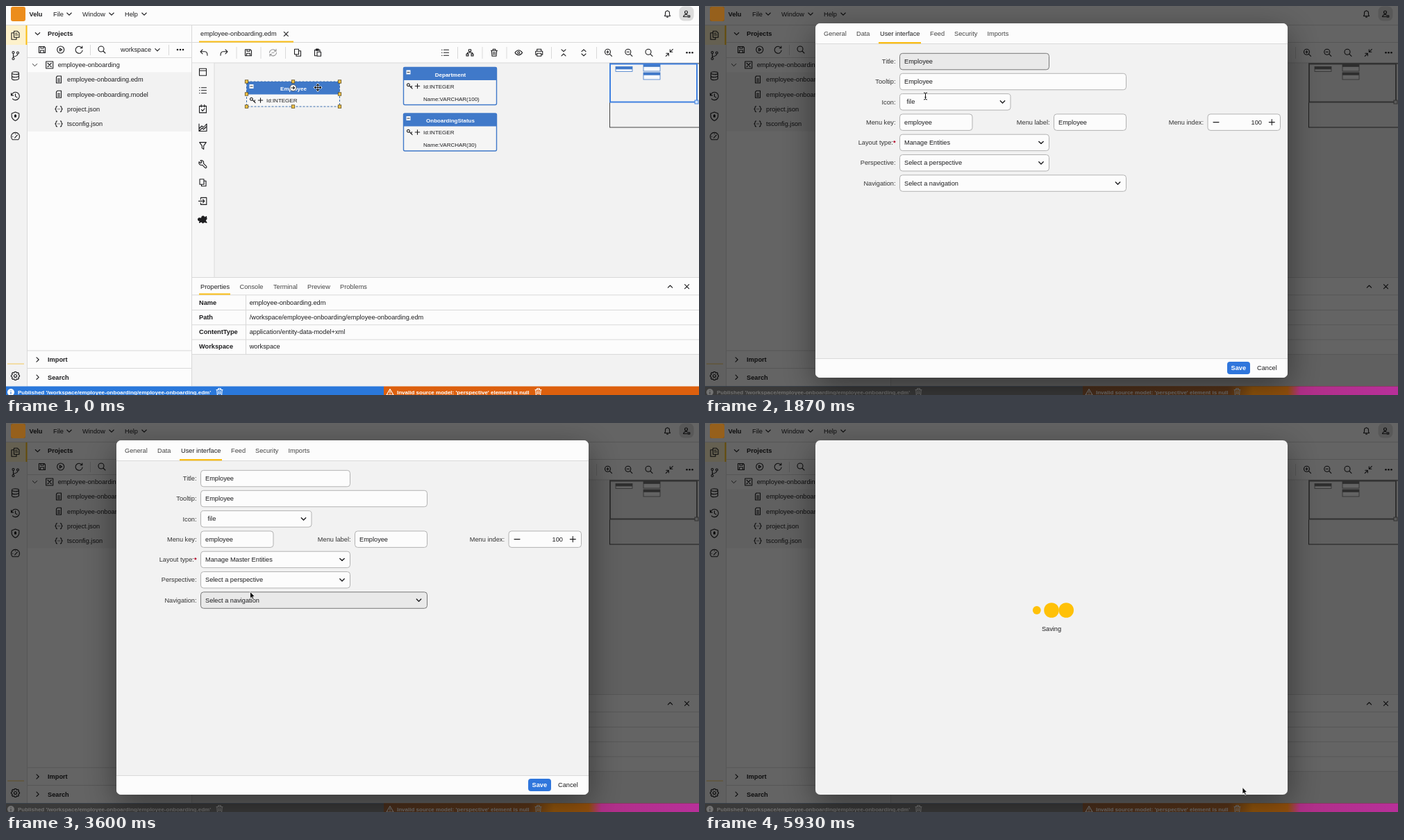
Animation, 998 px wide and 561 px high, one loop 6 s. Source, as an HTML page:

```html
<!DOCTYPE html>
<html lang="en">
<head>
<meta charset="utf-8">
<title>Entity editor</title>
<style>
  html, body { margin: 0; width: 100%; height: 100%; overflow: hidden; background: #f2f2f2; }
  svg { display: block; width: 998px; height: 561px; font: 9.23px "Liberation Sans", Arial, sans-serif; }
  text { fill: #1d1d1f; white-space: pre; }
  .b { font-weight: bold; }
  .icon { fill: none; stroke: #1d1d1f; stroke-width: 1.1; stroke-linejoin: round; stroke-linecap: round; }
  .dimmed #minimap { filter: grayscale(1); }
</style>
</head>
<body>
<svg id="stage" viewBox="0 0 998 561">
  <defs>
    <linearGradient id="dimBar" gradientUnits="userSpaceOnUse" x1="544" x2="998" y1="0" y2="0">
      <stop offset="0" stop-color="#4a2f1c"/>
      <stop offset=".46" stop-color="#583418"/>
      <stop offset=".54" stop-color="#93560c"/>
      <stop offset=".65" stop-color="#93500c"/>
      <stop offset=".69" stop-color="#b02f88"/>
      <stop offset="1" stop-color="#b8309a"/>
    </linearGradient>
    <filter id="shadow" x="-20%" y="-20%" width="140%" height="150%">
      <feDropShadow dx="0" dy="2" stdDeviation="3" flood-opacity=".28"/>
    </filter>
    <filter id="dialogShadow" x="-20%" y="-20%" width="140%" height="140%">
      <feDropShadow dx="0" dy="13" stdDeviation="24" flood-opacity=".45"/>
    </filter>
    <clipPath id="menuClip"><rect x="280" y="209" width="164" height="316" rx="4"/></clipPath>
  </defs>
  <g id="workbench"></g>
  <g id="modal"></g>
  <g id="cursor"></g>
</svg>
<script>
const LOOP = 6000;
const YELLOW = '#fabd14', BLUE = '#4079c9', LINE = '#d9d9d9', PAPER = '#fcfcfc', GREY = '#f2f2f2';
const $ = id => document.getElementById(id);

const SEARCH = 'M3-1A4 4 0 1 1-5-1A4 4 0 1 1 3-1M2 2L5 5';
const ICONS = {
  down: 'M-3.2-1.5L0 1.7L3.2-1.5', right: 'M-1.5-3.2L1.7 0L-1.5 3.2', up: 'M-3.2 1.5L0-1.7L3.2 1.5',
  close: 'M-3-3L3 3M3-3L-3 3', plus: 'M-4 0H4M0-4V4', minus: 'M-4 0H4', smallPlus: 'M-3.2 0H3.2M0-3.2V3.2',
  save: 'M-4.5-4.5H3L4.5-3V4.5H-4.5ZM-2-4.5V-2H2V-4.5M-2.5 4.5V1H2.5V4.5',
  play: 'M5 0A5 5 0 1 1-5 0A5 5 0 1 1 5 0M-1.3-2L2 0L-1.3 2Z',
  refresh: 'M4-2.5A5 5 0 1 0 4.8 1M4.5-5V-2.2H1.8',
  sync: 'M4-2.5A5 5 0 0 0-5 0M-4 2.5A5 5 0 0 0 5 0M4.5-5V-2.2H1.8M-4.5 5V2.2H-1.8M-1.5 0H1.5',
  search: SEARCH, zoomIn: SEARCH + 'M-2.7-1H.7M-1-2.7V.7', zoomOut: SEARCH + 'M-2.7-1H.7',
  undo: 'M-2-4.5L-5-1.5L-2 1.5M-5-1.5H1.5Q5-1.5 5 4', redo: 'M2-4.5L5-1.5L2 1.5M5-1.5H-1.5Q-5-1.5-5 4',
  copy: 'M-4.5-5H1.5V2.5H-4.5ZM1.5-2.5H4.5V5H-2V2.5', paste: 'M-2 4.5H-4.5V-4H3V-2M-2.5-5.2H1V-3H-2.5ZM-1-1H4.5V5H-1Z',
  list: 'M-5-4h.6M-2-4H5M-5 0h.6M-2 0H5M-5 4h.6M-2 4H5',
  tree: 'M-1.6-4.6H1.6V-1.8H-1.6ZM-5 1.8H-2V4.6H-5ZM2 1.8H5V4.6H2ZM0-1.8V0M-3.5 1.8V0H3.5V1.8',
  trash: 'M-4.5-3H4.5M-1.8-3V-5H1.8V-3M-3.7-3L-3 5H3L3.7-3M-1.1-1V3M1.1-1V3',
  eye: 'M-5.3 0Q0-7 5.3 0Q0 7-5.3 0ZM1.5 0A1.5 1.5 0 1 1-1.5 0A1.5 1.5 0 1 1 1.5 0',
  print: 'M-3-2V-5H3V-2M-3 3H-5V-2H5V3H3M-3 1H3V5H-3Z',
  collapse: 'M-3-4.5L0-1.7L3-4.5M-3 4.5L0 1.7L3 4.5', expand: 'M-3-1.7L0-4.5L3-1.7M-3 1.7L0 4.5L3 1.7',
  fit: 'M1-4.5V-1H4.5M5-5L1-1M-1 4.5V1H-4.5M-5 5L-1 1',
  window: 'M-5-5H5V5H-5ZM-5-2H5', calendar: 'M-5-4H5V5.5H-5ZM-2.3-6V-2.7M2.3-6V-2.7M-2 1L-.4 3L2.6-.5',
  chart: 'M-5.5-5V5.5H5.5V-5L1 0L-1.5-2L-5.5 2M-5 5L-1 1L1 3L5-1',
  filter: 'M-4.8-5H4.8L1.2 0V5L-1.2 3.3V0Z',
  wrench: 'M-5.5-3.5L-3-1.5L-1.5-3L-3.5-5.5A3.5 3.5 0 0 1 1-1L5 3A1.4 1.4 0 0 1 3 5L-1 1A3.5 3.5 0 0 1-5.5-3.5Z',
  enter: 'M-3-2.5V-5H5.3V5H-3V2.5M-6 0H2M0-2.5L2.3 0L0 2.5',
  puzzle: 'M-4-2H-1.5A2 2 0 1 1 2-2L5-4.5L5.5-1L3.5 1L5.5 4.5L2 3.5L0 5L-2 3L-5 4.5L-4 1.5A2 2 0 1 1-4-2Z',
  files: 'M-2-6H3L5.5-3.5V3H-2ZM-2-3.5H-5.5V6H1.5V3M0-3H2.5M0-.5H3.5',
  branch: 'M-3-3V3M3.5-2.5Q3 1-3 1.5M-1.5-4.5A1.5 1.5 0 1 1-4.5-4.5A1.5 1.5 0 1 1-1.5-4.5M-1.5 4.5A1.5 1.5 0 1 1-4.5 4.5A1.5 1.5 0 1 1-1.5 4.5M5-4A1.5 1.5 0 1 1 2-4A1.5 1.5 0 1 1 5-4',
  database: 'M-5-4A5 2 0 1 1 5-4A5 2 0 1 1-5-4V4A5 2 0 0 0 5 4V-4M-5 0A5 2 0 0 0 5 0',
  history: 'M-5.5-1A5.7 5.7 0 1 1-4 4M-6-4V-1H-3M0-3V.5L2.5 2', shield: 'M0-6L5.3-4.2V0Q5 4 0 6.3Q-5 4-5.3 0V-4.2ZM0-2.5V1M-1-1.5H1V.8H-1Z',
  gauge: 'M-4 4.5A6 6 0 1 1 4 4.5ZM-.8 1.8L2.8-2.2M-4 0h.3M0-4v.2',
  gear: 'M-1.2-6H1.2L1.7-4.2L3.6-5L5-3.5L4.2-1.7L6-1.1V1.1L4.2 1.7L5 3.5L3.6 5L1.7 4.2L1.2 6H-1.2L-1.7 4.2L-3.6 5L-5 3.5L-4.2 1.7L-6 1.1V-1.1L-4.2-1.7L-5-3.5L-3.6-5L-1.7-4.2ZM2 0A2 2 0 1 1-2 0A2 2 0 1 1 2 0',
  bell: 'M-4 3H4L3 1V-1.5A3 3 0 0 0-3-1.5V1ZM-1 4.6H1M0-4.5V-5',
  user: 'M1.5-2.5A2 2 0 1 1-2.5-2.5A2 2 0 1 1 1.5-2.5M-4.5 4A4 4 0 0 1 1 1.2M-4.5 4H.5M2 2.2H4.8V4.4H2Z',
  doc: 'M-2-5H3.5V5H-3.5V-3.4ZM-1.5-1H1.5M-1.5 1H1.5M-1.5 3H1.5',
  braces: 'M-2.5-4Q-4-4-4-2T-5.2 0Q-4 0-4 2T-2.5 4M2.5-4Q4-4 4-2T5.2 0Q4 0 4 2T2.5 4M-1 0h.1M1 0h.1',
  project: 'M-5-5H5V5H-5ZM-2.5-2.5L2.5 2.5M2.5-2.5L-2.5 2.5M-2.7-2.7h.2M2.5-2.7h.2M-2.7 2.7h.2M2.5 2.7h.2',
  key: 'M0 0L3.6 3.6M-.2-1.8A1.9 1.9 0 1 1-4-1.8A1.9 1.9 0 1 1-.2-1.8M2 2L3-.2',
  info: 'M0-.5V2.5M0-2.6V-2.5', warn: 'M0-4.5L5 4H-5ZM0-1.5V1M0 2.5V2.6', square: 'M-3.2-2.8H3.2V2.8H-3.2Z'
};

const rect = (x, y, w, h, fill, more = '') => `<rect x="${x}" y="${y}" width="${w}" height="${h}" fill="${fill}" ${more}/>`;
const text = (x, y, s, more = '') => `<text x="${x}" y="${y}" ${more}>${s}</text>`;
const bold = (x, y, s, more = '') => text(x, y, s, 'class="b" ' + more);
const icon = (name, x, y, more = '') => `<path class="icon" d="${ICONS[name]}" transform="translate(${x} ${y})" ${more}/>`;
const dots = (x, y) => [-4, 0, 4].map(d => `<circle cx="${x + d}" cy="${y}" r="1.3" fill="#1d1d1f"/>`).join('');
const hLine = (x, y, w, color = LINE) => rect(x, y, w, 1, color);
const vLine = (x, y, h, color = LINE) => rect(x, y, 1, h, color);
const iconRow = (y, items) => items.map(([name, x]) => icon(name, x, y)).join('');
const SMALL = 'font-size="8"', WHITE_SMALL = 'style="fill:#fff" font-size="8"';

function entity(x, y, title, columns, selected) {
  const w = 134, h = 18 + columns.length * 18, mid = x + w / 2;
  let s = rect(x, y, w, h, selected ? '#f7f7f7' : '#f5f5f5', `rx="${selected ? 0 : 2}"`) +
    rect(x, y, w, 18.5, BLUE) +
    rect(x, y, w, h, 'none', selected ? 'stroke="#3d6fae" stroke-dasharray="3 2"' : `stroke="${BLUE}" stroke-width="1.4" rx="2"`) +
    rect(x + 4, y + 4, 6, 6, '#fff') + hLine(x + 5, y + 6.5, 4, '#333') +
    bold(mid + .5, y + 13, title, 'text-anchor="middle" ' + WHITE_SMALL);
  columns.forEach((c, i) => s += text(x + 28.5, y + 30.3 + i * 18, c, SMALL));
  s += icon('key', x + 9, y + 27) + icon('smallPlus', x + 20, y + 27);
  if (selected) {
    for (const hx of [x, mid, x + w]) for (const hy of [y, y + h / 2, y + h])
      if (hx !== mid || hy !== y + h / 2) s += rect(hx - 2.2, hy - 2.2, 4.4, 4.4, '#f6c445', 'stroke="#5b4a1c" stroke-width=".8"');
    s += `<circle cx="${mid}" cy="${y + 9}" r="4.6" fill="#fff" stroke="#444" stroke-width=".8"/>` +
      `<path d="M${mid - 3} ${y + 9}h5m-2-2l2 2l-2 2" fill="none" stroke="#222" stroke-width="1.2"/>`;
  }
  return s;
}

function statusBar(fillLeft, fillRight, ink) {
  const st = `style="stroke:${ink}"`;
  return rect(0, 548.5, 544, 13, fillLeft) + rect(544, 548.5, 454, 13, fillRight) +
    `<circle cx="7" cy="557" r="5" fill="${ink}"/>` + icon('info', 7, 557, `style="stroke:${fillLeft}"`) +
    bold(17, 559.8, "Published '/workspace/employee-onboarding/employee-onboarding.edm'", `style="fill:${ink}" font-size="8"`) +
    icon('trash', 307.5, 556.5, st) + icon('warn', 553, 557, st) +
    bold(563, 559.8, "Invalid source model: 'perspective' element is null", `style="fill:${ink}" font-size="8"`) +
    icon('trash', 766.5, 556.5, st);
}

function workbench() {
  let s = rect(0, 0, 998, 561, GREY) + rect(0, 0, 998, 27, PAPER) + hLine(0, 27, 998) +
    rect(7, 1, 21, 21, '#ec8d1c', 'rx="3"') + bold(33.5, 14.5, 'Velu');
  [['File', 68, 91], ['Window', 110, 152], ['Help', 171, 199]].forEach(([n, x, c]) => s += text(x, 14.5, n) + icon('down', c, 11.5));
  s += icon('bell', 952.5, 11.5) + rect(969.5, .5, 21, 21, '#dcdcdc', 'rx="7"') + icon('user', 980, 11.5);

  s += rect(0, 28, 30, 28, '#fdf1cb') + rect(28.5, 28, 2, 28, YELLOW) + vLine(30, 56, 493);
  ['files', 'branch', 'database', 'history', 'shield', 'gauge'].forEach((n, i) => s += icon(n, 13.5, 42.3 + i * 29.2));
  s += rect(2, 515.5, 24, 1.2, '#f3cf73') + icon('gear', 13.5, 533.5);

  s += rect(31, 28, 236, 520, PAPER) + icon('down', 45.5, 40) + bold(60, 43.2, 'Projects') + hLine(31, 52, 236) +
    iconRow(63, [['save', 52], ['play', 78.7], ['refresh', 105.3], ['search', 138]]) +
    vLine(121, 56, 15) + vLine(234, 56, 15) + text(165, 66.2, 'workspace') + icon('down', 218, 63.2) + dots(251, 63) +
    hLine(31, 74, 236) + icon('down', 41.5, 85, 'style="stroke-width:.9"') + icon('project', 62.7, 85) + text(74.7, 88, 'employee-onboarding') +
    rect(31, 95.5, 236, 85.3, GREY);
  ['employee-onboarding.edm', 'employee-onboarding.model', 'project.json', 'tsconfig.json'].forEach((n, i) => {
    const y = 106 + i * 21.3;
    s += icon(i < 2 ? 'doc' : 'braces', 76, y) + text(88, y + 3.2, n);
  });
  s += hLine(31, 496.5, 236) + hLine(31, 522, 236) + vLine(267, 28, 520);
  [['Import', 510], ['Search', 535.3]].forEach(([n, y]) => s += icon('right', 45.5, y) + bold(60, y + 3.2, n));

  s += rect(268, 28, 730, 54, PAPER) + text(280, 43.3, 'employee-onboarding.edm') + icon('close', 403.3, 40.3) +
    hLine(268, 52, 730) + rect(278, 50.5, 136, 2, YELLOW) + hLine(268, 81.5, 730) +
    iconRow(67.3, [['undo', 285], ['redo', 314], ['save', 349], ['copy', 420], ['paste', 449], ['list', 632.5], ['tree', 668],
      ['trash', 703], ['eye', 738.3], ['print', 767.7], ['collapse', 803], ['expand', 832], ['zoomIn', 867.5],
      ['zoomOut', 896.8], ['search', 926], ['fit', 955.3]]) +
    icon('sync', 384.5, 67.3, 'opacity=".45"') + dots(984.5, 67.3);
  [331.5, 366.5, 402, 650, 685.5, 720.5, 785, 850].forEach(x => s += vLine(x, 59, 17));

  s += rect(268, 82.5, 32, 309, '#f7f7f7') + vLine(299.5, 82, 309);
  ['window', 'list', 'calendar', 'chart', 'filter', 'wrench', 'copy', 'enter', 'puzzle']
    .forEach((n, i) => s += icon(n, 283.5, 95.2 + i * 26.6, n === 'puzzle' ? 'style="fill:#1d1d1f"' : ''));

  s += entity(346.5, 109, 'Employee', ['Id:INTEGER'], true) +
    entity(572.5, 88.5, 'Department', ['Id:INTEGER', 'Name:VARCHAR(100)']) +
    entity(572.5, 155, 'OnboardingStatus', ['Id:INTEGER', 'Name:VARCHAR(30)']);

  s += '<g id="minimap">' + rect(869.5, 83, 135, 92, GREY, 'stroke="#444"');
  [[878, 87.5, 7], [918, 84, 10], [918, 96, 10]].forEach(([x, y, h]) =>
    s += rect(x, y, 24, h, '#f7f9fc', `stroke="${BLUE}" stroke-width=".8"`) + rect(x, y, 24, 3.8, BLUE));
  s += rect(870, 83.5, 125, 55, 'none', 'stroke="#3f80e0" stroke-width="2"') +
    rect(992, 136, 5, 5, '#d5e6fb', 'stroke="#3f80e0"') + '</g>';

  s += rect(268, 391, 730, 111, PAPER) + hLine(268, 391, 730);
  [['Properties', 280], ['Console', 336.5], ['Terminal', 385], ['Preview', 434], ['Problems', 481]]
    .forEach(([n, x], i) => s += text(x, 407.5, n, i ? 'style="fill:#444"' : ''));
  s += icon('up', 956.5, 404.7) + icon('close', 980.5, 404.7) + hLine(268, 416.3, 730) + rect(278, 414.5, 45, 2, YELLOW);
  [['Name', 'employee-onboarding.edm'], ['Path', '/workspace/employee-onboarding/employee-onboarding.edm'],
    ['ContentType', 'application/entity-data-model+xml'], ['Workspace', 'workspace']].forEach(([k, v], i) => {
    const y = 430.5 + i * 21.3;
    s += bold(278, y, k) + text(350.7, y, v) + hLine(268, y + 7.5, 730);
  });
  return s + vLine(345, 417, 85) + statusBar('#2a78db', '#dd600e', '#fff');
}

function label(x, y, s, required) {
  const star = required ? '<tspan fill="#b00020" font-weight="bold">*</tspan>' : '';
  return text(x, y + 3.2, s + ':' + star, 'text-anchor="end" style="fill:#333"');
}

function box(x, y, w, h, state) {
  const hover = state === 'hover';
  return rect(x + .5, y - 11.7, w - 1, h, hover ? '#e9e9e9' : PAPER, `rx="4" stroke="${hover ? '#777' : '#b2b2b2'}"`) +
    (state === 'focus' ? rect(x + 2, y - 10.2, w - 4, h - 3, 'none', 'rx="3" stroke="#8c8c8c"') : '');
}

function generalTab() {
  return label(274.5, 80, 'Name', true) + box(280, 80, 216, 23.5) + text(287, 83, 'Employee') +
    label(274.5, 109, 'Type', true) + box(280, 109, 105.5, 23.5) + text(287, 112, 'Primary Entity') + icon('square', 373, 109) +
    label(274.5, 138.3, 'Caption') + box(280, 138.3, 327, 23.5) + text(287, 141.5, 'Manage entity Employee') +
    label(274.5, 175.3, 'Description') + box(280, 167.5, 327, 39.5) + text(287, 171.3, 'Manage entity Employee') +
    rect(284.7, 205.7, 14, 14, PAPER, 'rx="3" stroke="#b2b2b2"') + text(306.5, 215.8, 'Generate Report');
}

const FIELDS = [
  { name: 'Title', y: 80, x: 280, w: 216 }, { name: 'Tooltip', y: 109, x: 280, w: 327 },
  { name: 'Icon', y: 138.3, x: 280, w: 160.5, select: 428.5 }, { name: 'Menu key', y: 167.6, x: 280, w: 105.5 },
  { name: 'Menu label', y: 167.6, x: 502, w: 105 }, { name: 'Menu index', y: 167.6, x: 723.5, w: 105.5 },
  { name: 'Layout type', y: 196.9, x: 280, w: 216, select: 484, required: true },
  { name: 'Perspective', y: 226.2, x: 280, w: 216, select: 484 }, { name: 'Navigation', y: 255.5, x: 280, w: 327, select: 594.5 }
];
const LAYOUTS = ['Manage Entities', 'Manage Master Entities', 'Manage Details Entities', 'List Entities', 'List Master Entities',
  'List Details Entities', ...['Table', 'Bar Chart', 'Line Chart', 'Doughnut Chart', 'Pie Chart', 'Polar Area'].map(k => `Report in a ${k} Format`)];

function interfaceTab({ layout, perspective, menu, hover, option }) {
  const values = ['Employee', 'Employee', 'file', 'employee', 'Employee', '', layout, perspective, 'Select a navigation'];
  let s = FIELDS.map((f, i) => label(f.x - 5.5, f.y, f.name, f.required) +
    box(f.x, f.y, f.w, 23.5, menu === f.name ? 'focus' : hover === f.name ? 'hover' : '') +
    text(f.x + (f.name === 'Icon' ? 10.5 : 7), f.y + 3, values[i]) + (f.select ? icon('down', f.select, f.y, 'style="stroke-width:1.4"') : '')).join('');
  s += icon('minus', 736, 167.6) + text(802, 170.7, '100', 'text-anchor="end"') + icon('plus', 816.3, 167.6);
  if (menu === 'Layout type') {
    s += rect(280, 209, 164, 316, PAPER, 'rx="4" filter="url(#shadow)"') + '<g clip-path="url(#menuClip)">' +
      rect(280, 209, 164, 26.5, '#fdf1cb') + rect(280, 234.7, 164, 1, '#f0c24c');
    if (option > 0) s += rect(280, 209 + option * 26.6, 164, 26.6, '#ebebeb');
    s += LAYOUTS.map((n, i) => text(290, 224.8 + i * 26.6, n)).join('') + '</g>';
  }
  if (menu === 'Perspective')
    s += rect(279.5, 238.5, 61.5, 26.5, option >= 0 ? '#ebebeb' : PAPER, 'rx="4" filter="url(#shadow)"') + text(290, 254.5, 'Employee');
  return s;
}

const TABS = [['General', 171, 36], ['Data', 218, 0], ['User interface', 252, 61], ['Feed', 324, 0], ['Security', 359, 0], ['Imports', 406.5, 0]];

function modal(state) {
  if (!state.page) return '';
  let s = rect(0, 0, 998, 561, '#000', 'opacity=".6"') + rect(7, 1, 21, 21, '#96601c', 'rx="3"') +
    statusBar('#3a3a3a', 'url(#dimBar)', '#727272') +
    rect(159, 25, 680, 511, GREY, 'rx="7" filter="url(#dialogShadow)"');
  if (state.page === 'saving')
    return s + [0, 1, 2].map(i => `<circle class="dot" cx="${477.8 + i * 21.2}" cy="270" fill="#ffc107"/>`).join('') +
      text(499, 299.5, 'Saving', 'text-anchor="middle"');
  s += `<path d="M159 54V32a7 7 0 0 1 7-7h666a7 7 0 0 1 7 7V54ZM159 508.5h680V529a7 7 0 0 1-7 7h-666a7 7 0 0 1-7-7Z" fill="${PAPER}"/>` +
    hLine(159, 54, 680) + hLine(159, 508, 680);
  TABS.forEach(([n, x, w]) => {
    const active = n === state.page;
    s += text(x, 43.2, n, active ? '' : 'style="fill:#444"') + (active ? rect(x - 2, 52, w, 2.3, YELLOW) : '');
  });
  s += rect(752, 513, 33, 18, '#2f76dc', 'rx="4"') + bold(768.3, 525.2, 'Save', 'text-anchor="middle" style="fill:#fff"') + text(795, 525.2, 'Cancel');
  return s + (state.page === 'General' ? generalTab() : interfaceTab(state));
}

const MOVE = 'M-4 0H4M0-4V4M-1.5-3L0-4.6L1.5-3M-1.5 3L0 4.6L1.5 3M-3-1.5L-4.6 0L-3 1.5M3-1.5L4.6 0L3 1.5';
const POINTERS = {
  arrow: '<path d="M0 0V9.6L2.2 7.6L3.8 11L5.4 10.2L3.9 7H6.8Z" fill="#000" stroke="#fff" stroke-width=".8"/>',
  hand: '<path d="M-.8 0Q.3-1.2 1.1 0V3.2L5 4.3Q6.3 4.8 6 6.3L5 10H.2L-3 6.2Q-3.2 4.9-2 5L-.8 6Z" fill="#fff" stroke="#111" stroke-width=".9"/>',
  beam: '<path d="M-2.5-5Q0-5 0-3.5Q0-5 2.5-5M0-3.5V3.5M-2.5 5Q0 5 0 3.5Q0 5 2.5 5M-1.2 1.5H1.2" fill="none" stroke="#111"/>',
  move: `<path d="${MOVE}" fill="none" stroke="#fff" stroke-width="2.6"/><path d="${MOVE}" fill="none" stroke="#111" stroke-width="1.1"/>`
};

// time, x, y of the pointer's hot spot
const PATH = [[0, 449, 117.5], [70, 449, 117.5], [600, 481, 124.5], [800, 481, 124.5], [1000, 349.5, 97.5], [1230, 284, 41],
  [1600, 284, 41], [1870, 317.5, 130], [2200, 335, 198], [2300, 335, 200], [2870, 352, 244], [3530, 352, 244],
  [4000, 345, 233.5], [4200, 345, 233.5], [4530, 322, 249], [5000, 322, 249], [5200, 774, 525.5], [LOOP, 774, 525.5]];

function pointerAt(t) {
  const i = Math.max(1, PATH.findIndex(p => p[0] >= t));
  const [t0, x0, y0] = PATH[i - 1], [t1, x1, y1] = PATH[i];
  const u = Math.max(0, (t - t0) / (t1 - t0)), e = u * u * (3 - 2 * u);
  return [x0 + (x1 - x0) * e, y0 + (y1 - y0) * e];
}

const fieldAt = ([x, y]) => FIELDS.find(f => x >= f.x && x <= f.x + f.w && Math.abs(y - f.y) <= 12);
const between = (t, a, b) => t >= a && t < b;

function stateAt(t) {
  const y = pointerAt(t)[1];
  const page = t < 900 ? '' : t < 1270 ? 'General' : t < 5400 ? 'User interface' : 'saving';
  const menu = between(t, 2270, 3330) ? 'Layout type' : between(t, 4000, 4600) ? 'Perspective' : '';
  // hover styling trails the pointer
  const hovered = page === 'User interface' && !menu && fieldAt(pointerAt(t - 140));
  const option = menu === 'Layout type' ? Math.floor((y - 209) / 26.6) : menu && y > 239 ? 0 : -1;
  return {
    page, menu, option, hover: hovered ? hovered.name : '',
    layout: LAYOUTS[t < 3330 ? 0 : 1], perspective: t < 4600 ? 'Select a perspective' : 'Employee'
  };
}

function pointerKind(t, page, menu, point) {
  if (!page) return point[0] < 479 ? 'move' : 'arrow';
  if (page !== 'User interface') return 'arrow';
  if (menu) return 'hand';
  const f = fieldAt(point);
  if (f) return f.select && f.name !== 'Icon' ? 'hand' : 'beam';
  return t > 5150 ? 'hand' : 'arrow';
}

const clamp = v => Math.min(1, Math.max(0, v));
const dotRadius = (t, i) => 5.8 + 5 * clamp(.5 + .75 * Math.cos(2 * Math.PI * ((t - 5930) / 1000 + .36 - i * .24)));

let shownState = '', shownPointer = '';
function render(t) {
  const state = stateAt(t), key = JSON.stringify(state);
  if (key !== shownState) {
    $('modal').innerHTML = modal(state);
    $('stage').classList.toggle('dimmed', !!state.page);
    shownState = key;
  }
  document.querySelectorAll('.dot').forEach((d, i) => d.setAttribute('r', dotRadius(t, i)));
  const point = pointerAt(t), kind = pointerKind(t, state.page, state.menu, point);
  if (kind !== shownPointer) $('cursor').innerHTML = POINTERS[shownPointer = kind];
  $('cursor').setAttribute('transform', `translate(${point[0].toFixed(2)} ${point[1].toFixed(2)})`);
}

$('workbench').innerHTML = workbench();
const start = performance.now();
function tick() {
  render((performance.now() - start) % LOOP);
  requestAnimationFrame(tick);
}
tick();
</script>
</body>
</html>
```
